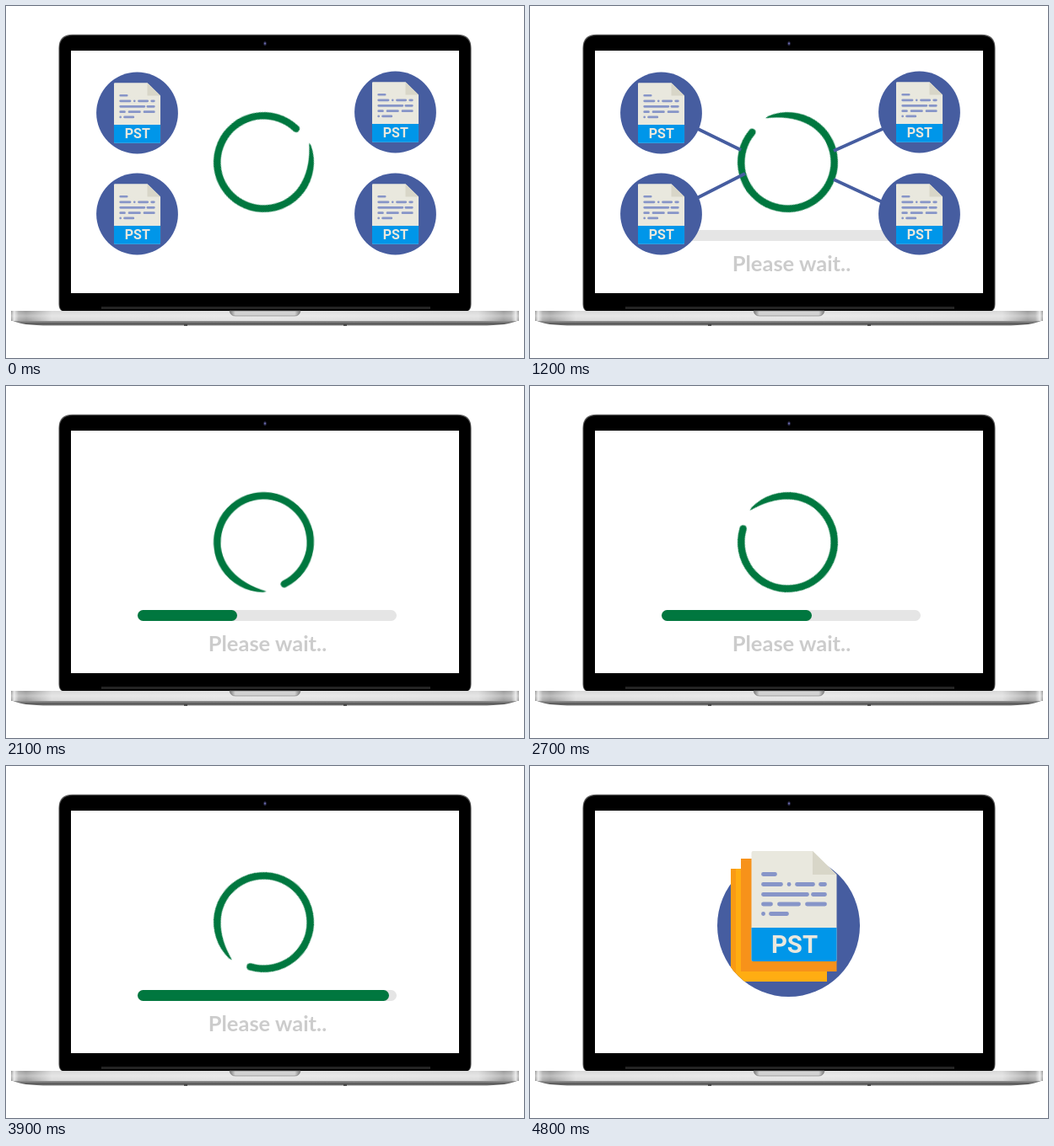
An HTML page without scripts for the animation above (5500 ms loop, 614 by 418 pixels).

```html
<!DOCTYPE html>
<html lang="en">
<head>
<meta charset="utf-8">
<title>Merging files</title>
<style>
  html, body { margin: 0; width: 100%; height: 100%; overflow: hidden; background: #fff; }
  svg { display: block; width: 614px; height: 418px; }

  .blue { fill: #465da0; }
  .green { fill: #00773f; }
  .tag { font: 700 29.4px Roboto, Arial, sans-serif; fill: #e9e8de; text-anchor: middle; }
  .wait { font: 700 25.5px Lato, sans-serif; fill: #ccc; text-anchor: middle; }
  .rows { fill: none; stroke: #8795c8; stroke-width: 4.8; stroke-linecap: round; }

  .files, .load, .ring, .result { animation: 5.5s step-end infinite; }
  .files { animation-name: files; }
  .load { animation-name: load; }
  .ring { animation-name: ring; }
  .result { animation-name: result; }
  .spin { animation: spin 5.5s infinite; }
  .fill { animation: fill 5.5s steps(28) infinite; }
  .links path {
    fill: none; stroke: #465da0; stroke-width: 4;
    stroke-dasharray: 1 2;
    animation: grow 5.5s steps(3) infinite backwards;
  }
  .links path:nth-child(2) { animation-delay: .3s; }
  .links path:nth-child(3) { animation-delay: .6s; }
  .links path:nth-child(4) { animation-delay: .9s; }

  @keyframes files { 0% { visibility: visible } 23.636%, 100% { visibility: hidden } }
  @keyframes load { 0% { visibility: hidden } 21.818% { visibility: visible } 74.545%, 100% { visibility: hidden } }
  @keyframes ring { 0% { visibility: visible } 74.545%, 100% { visibility: hidden } }
  @keyframes result {
    0% { opacity: 0 }
    74.545% { opacity: .33 }
    76.363% { opacity: .505 }
    80% { opacity: .67 }
    83.636% { opacity: .83 }
    87.272%, 100% { opacity: 1 }
  }
  @keyframes spin {
    0% { transform: rotate(-22deg); animation-timing-function: steps(8) }
    14.545% { transform: rotate(150deg); animation-timing-function: steps(7) }
    27.272% { transform: rotate(315deg); animation-timing-function: steps(12) }
    49.09% { transform: rotate(581deg); animation-timing-function: steps(7) }
    61.818% { transform: rotate(738.5deg); animation-timing-function: steps(7) }
    74.545%, 100% { transform: rotate(896deg) }
  }
  @keyframes fill { 0%, 21.818% { width: 28px } 72.727%, 100% { width: 308px } }
  @keyframes grow {
    0% { stroke-dashoffset: 1 }
    5.454%, 50% { stroke-dashoffset: 0 }
    50.01%, 100% { stroke-dashoffset: 1 }
  }
</style>
</head>
<body>
<svg viewBox="0 0 614 418">
  <defs>
    <linearGradient id="metal">
      <stop offset="0" stop-color="#888"/>
      <stop offset=".006" stop-color="#e2e2e2"/>
      <stop offset=".015" stop-color="#a0a0a0"/>
      <stop offset=".03" stop-color="#8e8e8e"/>
      <stop offset=".08" stop-color="#d4d4d4"/>
      <stop offset=".5" stop-color="#dedede"/>
      <stop offset=".92" stop-color="#d4d4d4"/>
      <stop offset=".97" stop-color="#8e8e8e"/>
      <stop offset=".985" stop-color="#a0a0a0"/>
      <stop offset=".994" stop-color="#e2e2e2"/>
      <stop offset="1" stop-color="#888"/>
    </linearGradient>
    <linearGradient id="shine" x2="0" y2="1">
      <stop offset="0" stop-color="#fff" stop-opacity=".1"/>
      <stop offset=".5" stop-color="#fff" stop-opacity=".4"/>
      <stop offset="1" stop-color="#fff" stop-opacity=".1"/>
    </linearGradient>
    <linearGradient id="under" x2="0" y2="1">
      <stop offset="0" stop-color="#a8a8a8"/>
      <stop offset=".7" stop-color="#555"/>
      <stop offset="1" stop-color="#888"/>
    </linearGradient>
    <linearGradient id="notch">
      <stop offset="0" stop-color="#777"/>
      <stop offset=".08" stop-color="#d2d2d2"/>
      <stop offset=".92" stop-color="#d2d2d2"/>
      <stop offset="1" stop-color="#777"/>
    </linearGradient>
    <clipPath id="stack">
      <rect x="222" y="95" width="169" height="94"/>
      <circle cx="306.5" cy="189.5" r="84.5"/>
    </clipPath>

    <g id="doc">
      <path d="M2 0H72.5L101 28V129a2 2 0 0 1-2 2H2a2 2 0 0 1-2-2V2a2 2 0 0 1 2-2" fill="#e9e8de"/>
      <path d="M72.5 0V28H101z" fill="#d8d6c8"/>
      <path d="M0 91H101V129a2 2 0 0 1-2 2H2a2 2 0 0 1-2-2z" fill="#0096e9"/>
      <path class="rows" d="M14 27.5h14M14 39.5h21M44.5 39.5h.1M54 39.5h19M82 39.5h5M14 51.5h52M73 51.5h14M14 63h9M33 63h23M66 63h21M14 74.5h.1M23 74.5h19"/>
      <text class="tag" x="51" y="121">PST</text>
    </g>
    <g id="file">
      <circle class="blue" r="48.4"/>
      <use href="#doc" transform="translate(-27.5 -35.7) scale(.545)"/>
    </g>
  </defs>

  <!-- laptop -->
  <path d="M66 362Q62.5 360 62.5 354V50Q62.5 33.8 79 33.8H535Q551.5 33.8 551.5 50V354Q551.5 360 548 362z" fill="#555"/>
  <path d="M67 362Q63.5 360 63.5 354V50.5Q63.5 35 79.5 35H534.5Q550.5 35 550.5 50.5V354Q550.5 360 547 362z"/>
  <path d="M113 358.5H503" stroke="#242424" stroke-width="3"/>
  <path d="M77 53H537V341H77z" fill="#fff"/>
  <ellipse cx="307" cy="44.5" rx="1.8" ry="2.6" fill="#2c2c4c"/>
  <circle cx="307" cy="44.5" r="1" fill="#7070b4"/>
  <path d="M6 373H608Q596 379.5 562 379.5H52Q18 379.5 6 373" fill="url(#under)"/>
  <path d="M211 379h4M400 379h4" stroke="#333" stroke-width="1.5"/>
  <path d="M6 362H608V374H6z" fill="url(#metal)"/>
  <path d="M6 362H608V374H6z" fill="url(#shine)"/>
  <path d="M265 362H349Q348 368 342 368H272Q266 368 265 362" fill="url(#notch)" stroke="#858585" stroke-width=".7"/>

  <g class="load">
    <rect x="156" y="266" width="307" height="13" rx="6.5" fill="#e5e5e5"/>
    <rect class="fill green" x="156" y="266" width="28" height="13" rx="6.5"/>
    <text class="wait" x="310" y="315">Please wait..</text>
  </g>

  <g class="ring" transform="translate(305.5 185.5)">
    <path class="spin green" d="M58.4-1Q59.3 1 59.4 3A59.5 59.5 0 1 1 54.35-24.2A4.25 4.25 0 0 0 46.6-20.74A51 51 0 1 0 32.8 39.1Q49.7 24.9 58.4-1"
      style="display:none"/>
    <path class="spin green" d="M58.4-1Q59.3 1 59.4 3A59.5 59.5 0 1 1 54.35-24.2A4.25 4.25 0 0 1 46.6-20.74A51 51 0 1 0 32.8 39.1Q49.7 24.9 58.4-1"/>
  </g>

  <g class="files">
    <g class="links">
      <path pathLength="1" d="M198 145.5L250 171"/>
      <path pathLength="1" d="M198 228L255 199"/>
      <path pathLength="1" d="M418 233L360 206"/>
      <path pathLength="1" d="M419 145.5L360 172"/>
    </g>
    <use href="#file" x="155.5" y="127"/>
    <use href="#file" x="155.5" y="247"/>
    <use href="#file" x="461.5" y="126"/>
    <use href="#file" x="461.5" y="247"/>
  </g>

  <g class="result">
    <circle class="blue" cx="306.5" cy="189.5" r="84.5"/>
    <g clip-path="url(#stack)">
      <path d="M238 122H250V244H352V256H238z" fill="#ffad12"/>
      <path d="M238 122H244V256H238z" fill="#f99b14"/>
      <path d="M250 110H263V231H363.5V244H250z" fill="#f7921a"/>
    </g>
    <use href="#doc" x="262.5" y="101"/>
  </g>
</svg>
</body>
</html>
```
